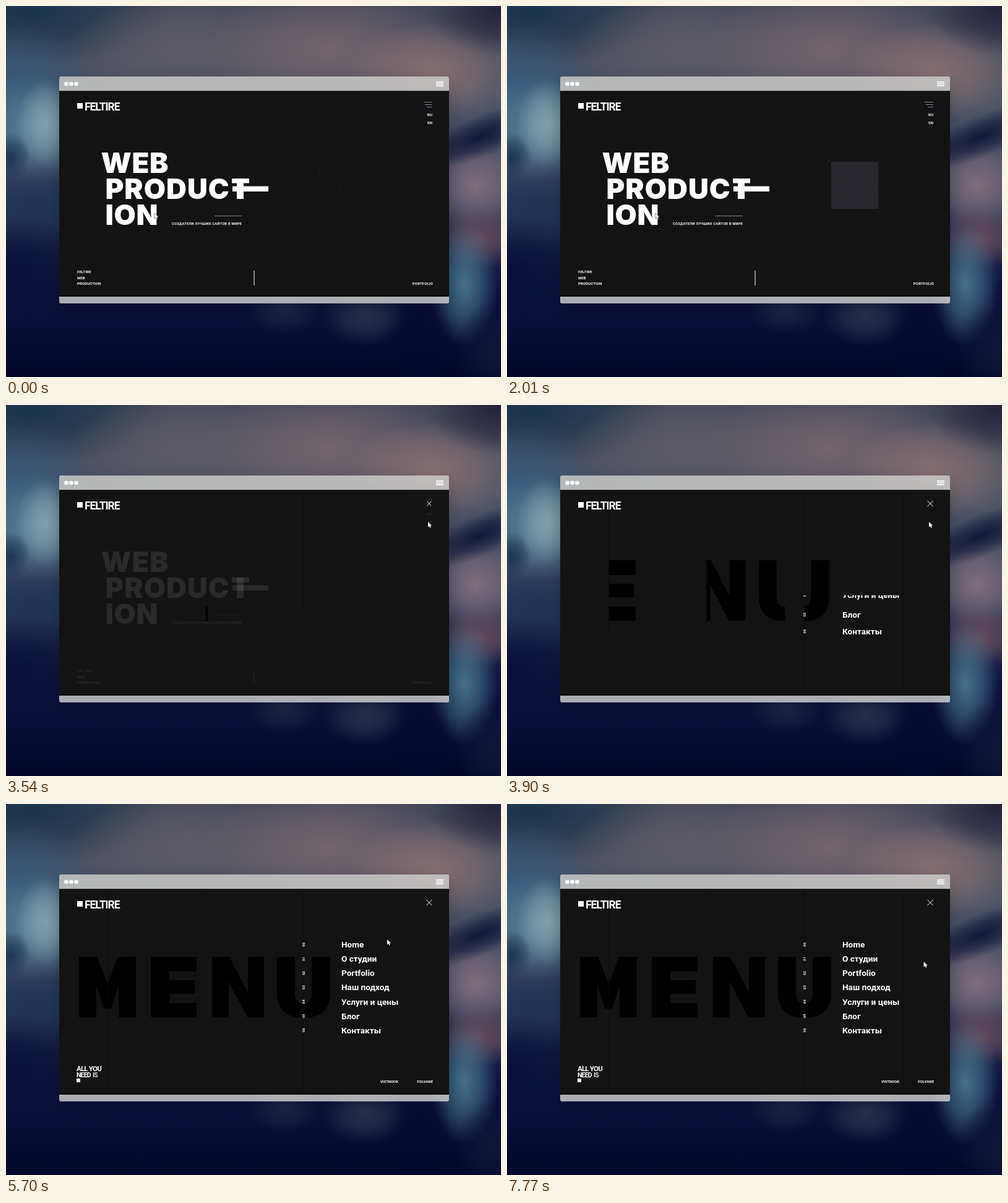
An HTML page with a canvas that plays this animation: 800x600 px, repeating every 7.8 s.

```html
<!DOCTYPE html>
<html lang="ru">
<head>
<meta charset="utf-8">
<title>Web production</title>
<style>
html, body { margin: 0; width: 100%; height: 100%; overflow: hidden; background: #04082a; }
canvas { display: block; }
</style>
</head>
<body>
<canvas id="stage" width="800" height="600"></canvas>
<script>
const LOOP = 7800, DARK = '#131313', WHITE = '#fff', VIOLET = '#85839a';
const canvas = document.getElementById('stage');
let ctx = canvas.getContext('2d');

const clamp = v => Math.max(0, Math.min(1, v));
const ramp = (t, start, length) => clamp((t - start) / length);
const easeOut = u => 1 - (1 - u) ** 3;
const easeInOut = u => u < .5 ? 4 * u ** 3 : 1 - 4 * (1 - u) ** 3;

function rect(x, y, w, h, color) {
  ctx.fillStyle = color;
  ctx.fillRect(x, y, w, h);
}

function text(s, x, y, size, spacing = 0, weight = 700, family = 'Roboto') {
  ctx.font = `${weight} ${size}px ${family}, sans-serif`;
  ctx.letterSpacing = spacing + 'px';
  ctx.fillStyle = WHITE;
  ctx.fillText(s, x, y);
}

function textRight(s, right, y, size, spacing) {
  ctx.textAlign = 'right';
  text(s, right + spacing, y, size, spacing);
  ctx.textAlign = 'left';
}

function clipped(x, y, w, h, draw) {
  ctx.save();
  ctx.beginPath();
  ctx.rect(x, y, w, h);
  ctx.clip();
  draw();
  ctx.restore();
}

// Content drops into its box from above
function drop(u, top, height, draw) {
  if (u <= 0) return;
  clipped(86, top, 630, height, () => {
    ctx.translate(0, -height * (1 - easeOut(u)));
    draw();
  });
}

// Blurred backdrop: x, y, radii, colour, tilt
const blobs = [
  [40, 10, 220, 90, '#16324c'],
  [20, 130, 130, 100, '#33597a'],
  [300, 70, 200, 90, '#5d5b65'],
  [520, 70, 200, 100, '#74656c'],
  [690, 105, 140, 80, '#8a7072'],
  [800, 0, 120, 80, '#20203a'],
  [45, 200, 110, 90, '#54809a'],
  [66, 190, 50, 70, '#86a4ae'],
  [8, 245, 32, 40, '#1c3450'],
  [45, 325, 110, 70, '#1e3356'],
  [20, 430, 130, 90, '#091038'],
  [760, 290, 90, 80, '#85707e'],
  [765, 212, 110, 34, '#0e1436', -.4],
  [765, 375, 75, 50, '#6a4c5c'],
  [740, 450, 55, 100, '#4a7890'],
  [795, 555, 70, 80, '#10173a'],
  [580, 500, 70, 50, '#2c3450'],
  [450, 490, 60, 40, '#1e2848'],
  [668, 545, 55, 85, '#040a30']
];

function frosted(y, h, corners) {
  ctx.fillStyle = 'rgba(203,203,201,.84)';
  ctx.beginPath();
  ctx.roundRect(86, y, 630, h, corners);
  ctx.fill();
}

function makeBackdrop() {
  const layer = document.createElement('canvas');
  layer.width = 800;
  layer.height = 600;
  const screen = ctx;
  ctx = layer.getContext('2d');

  const sky = ctx.createLinearGradient(0, 0, 0, 600);
  ['#45485a', '#505667', '#34405e', '#0c1440', '#03072a']
    .forEach((color, i) => sky.addColorStop(i / 4, color));
  rect(0, 0, 800, 600, sky);

  for (const [x, y, rx, ry, color, tilt = 0] of blobs) {
    ctx.save();
    ctx.translate(x, y);
    ctx.rotate(tilt);
    ctx.scale(rx, ry);
    const glow = ctx.createRadialGradient(0, 0, 0, 0, 0, 1);
    glow.addColorStop(0, color + 'f0');
    glow.addColorStop(.5, color + '90');
    glow.addColorStop(1, color + '00');
    rect(-1, -1, 2, 2, glow);
    ctx.restore();
  }

  // Shadow is cast only outside the window
  ctx.save();
  ctx.beginPath();
  ctx.rect(0, 0, 800, 600);
  ctx.roundRect(86, 114, 630, 367, 3);
  ctx.clip('evenodd');
  ctx.shadowColor = 'rgba(0,0,10,.25)';
  ctx.shadowBlur = 30;
  ctx.shadowOffsetY = 10;
  ctx.beginPath();
  ctx.roundRect(87, 115, 628, 365, 4);
  ctx.fill();
  ctx.restore();

  frosted(114, 24, [3, 3, 0, 0]);
  frosted(470, 11, [0, 0, 3, 3]);
  rect(86, 138, 630, 332, DARK);
  rect(86, 137, 630, 1, '#333');
  rect(86, 468, 630, 2, '#080808');
  ctx.fillStyle = WHITE;
  for (const x of [97.5, 105.5, 113.5]) {
    ctx.beginPath();
    ctx.arc(x, 126, 3.3, 0, 7);
    ctx.fill();
  }
  for (const y of [122, 125, 128]) rect(695, y, 12, 1.7, WHITE);
  rect(115, 157, 9, 9, WHITE);
  text('FELTIRE', 127, 169, 17.5, -1.1);

  ctx = screen;
  return layer;
}

// A plain square gathers among drifting dust, then vanishes
function drawEmblem(t) {
  const shown = easeInOut(ramp(t, 60, 1200)) * (1 - easeInOut(ramp(t, 2460, 500)));
  const side = 76 * shown;
  rect(562 - side / 2, 290 - side / 2, side, side, '#28272d');
  if (t > 2960) return;
  for (let i = 0; i < 9; i++) {
    const x = 492 + (i * 47.3) % 128, y = 222 + (i * 71.7) % 168;
    ctx.globalAlpha = .16 + .14 * Math.sin(i * 2.4 + t / 260);
    rect(x + (562 - x) * shown * .4, y + (290 - y) * shown * .4, 1.5, 1.5, '#aaa');
  }
  ctx.globalAlpha = 1;
}

function drawHome(t) {
  const leave = ramp(t, 3270, 300);
  if (leave >= 1) return;
  drawEmblem(t);
  ctx.save();
  ctx.globalAlpha = 1 - leave;

  text('WEB', 153.5, 270, 45.5, .7, 900, 'Inter');
  text('PRODUC', 160.5, 312, 45.5, 1, 900, 'Inter');
  text('ION', 160.5, 354, 45.5, .7, 900, 'Inter');
  rect(365, 279, 28, 7.5, WHITE);
  rect(373, 279, 11, 33, WHITE);
  rect(366, 291.5, 58, 8.5, WHITE);

  rect(337, 339, 44, 1, VIOLET);
  text('СОЗДАТЕЛИ ЛУЧШИХ САЙТОВ В МИРЕ', 268, 354, 5.6, .3);
  ['FELTIRE', 'WEB', 'PRODUCTION'].forEach((s, i) => text(s, 115, 432.4 + i * 9.3, 6, .1));
  textRight('PORTFOLIO', 690, 450.6, 6, .15);
  textRight('RU', 689, 177.5, 6, .2);
  textRight('EN', 689, 191, 6, .2);

  const pulse = ramp(t, 60, 660) + ramp(t, 2460, 600);
  const grow = easeInOut(pulse % 1);
  if (grow < .5) rect(400.5, 428 + 48 * grow, 1, 24 * (1 - 2 * grow), WHITE);
  else rect(400.5, 428, 1, 24 * (2 * grow - 1), WHITE);

  const hover = easeInOut(ramp(t, 2760, 340));
  const reach = 680 - 475 * hover + 475 * easeInOut(leave);
  rect(675, 155, 13.5, 1, VIOLET);
  rect(677 - 2 * hover, 159, 11.5 + 2 * hover, 1, VIOLET);
  rect(reach, 163, 688.5 - reach, 1, VIOLET);
  ctx.restore();
}

const menuWord = new Path2D(
  'M118 345V247H147L164 291L181 247H210V345H182V293L170 331H158L146 293V345Z' +
  'M234 247H308V271H264V285H305V307H264V322H308V345H234Z' +
  'M333 247H361L391 305V247H417V345H390L360 287V345H333Z' +
  'M438 247V305Q438 346 481 346Q524 346 524 305V247H494V306Q494 322 481 322Q467 322 467 306V247Z');
const edges = [86, 164.5, 322.5, 480.5, 640.5];
const starts = [4350, 3540, 3395, 3230, 3100];
const items = ['Home', 'О студии', 'Portfolio', 'Наш подход', 'Услуги и цены', 'Блог', 'Контакты'];

function drawMenu(t) {
  if (t < 3230) return;
  const lift = Math.max(0, 4 - Math.max(0, t - 3900) / 240);

  edges.forEach((x, k) => {
    const p = easeInOut(ramp(t, starts[k], 800));
    if (k) rect(x - .5, 138, 1, 330 * p ** .35, '#0d0d0d');
    if (k > 3 || !p) return;
    const width = edges[k + 1] - x, shift = -158 * (1 - p);
    if (width + shift <= 0) return;
    clipped(x, 138, width + shift, 330, () => {
      ctx.translate(shift, lift);
      ctx.fillStyle = '#000';
      ctx.fill(menuWord);
    });
  });

  items.forEach((name, i) => {
    const base = 232.2 + i * 23.08 + Math.min(1.2, lift);
    drop(ramp(t, 3835 + (4 - i) * 100, 400), base - 18, 24, () => {
      text(name, 542, base, 13.6);
      ctx.save();
      ctx.translate(483, base - 1.5);
      ctx.rotate(-Math.PI / 2);
      text('0' + i, 0, 0, 5.6, .2);
      ctx.restore();
    });
  });
  const hover = easeInOut(ramp(t, 5960, 240)) - easeInOut(ramp(t, 6510, 180));
  rect(489, 250, 46 * hover, 1, WHITE);

  const foot = ramp(t, 4460, 500);
  drop(foot, 422, 11, () => text('ALL YOU', 114, 432, 11.5, -.8));
  drop(foot, 432, 11, () => {
    text('NEED', 114, 441.6, 10.5, -.8);
    text('IS', 140, 441.6, 10.5, -.6, 500);
  });
  drop(foot, 443, 9, () => rect(114, 444, 6, 6, WHITE));
  drop(foot, 442, 11, () => textRight('FOLVANE', 690, 450.8, 6, .05));
  drop(ramp(t, 4600, 500), 442, 11, () => textRight('VISTNOOK', 634, 450.8, 6, -.05));

  const cross = 4.6 * easeOut(ramp(t, 3400, 400));
  ctx.strokeStyle = WHITE;
  ctx.lineWidth = 1;
  ctx.beginPath();
  for (const s of [1, -1]) {
    ctx.moveTo(684 - cross, 159.5 - s * cross);
    ctx.lineTo(684 + cross, 159.5 + s * cross);
  }
  ctx.stroke();
}

// Time, x, y
const route = [
  [0, 240, 335], [2460, 240, 335], [3000, 681, 185], [3270, 681, 185], [3500, 682, 189],
  [4890, 682, 189], [5600, 616, 219], [5700, 616, 219], [6050, 585, 250], [6480, 673.5, 255],
  [LOOP, 673.5, 255]
];
const arrow = new Path2D('M0 0V8.6L2 6.8L3.4 9.8L4.9 9.1L3.6 6.2H6.2Z');

function drawCursor(t) {
  const next = route.findIndex(point => point[0] > t);
  const [t0, x0, y0] = route[next - 1], [t1, x1, y1] = route[next];
  const p = easeInOut(ramp(t, t0, t1 - t0));
  ctx.save();
  ctx.translate(x0 + (x1 - x0) * p, y0 + (y1 - y0) * p);
  ctx.strokeStyle = '#000';
  ctx.lineWidth = .8;
  ctx.stroke(arrow);
  ctx.fillStyle = WHITE;
  ctx.fill(arrow);
  ctx.restore();
}

const backdrop = makeBackdrop();
const begin = performance.now();

function render() {
  const t = (performance.now() - begin) % LOOP;
  ctx.drawImage(backdrop, 0, 0);
  drawHome(t);
  drawMenu(t);
  drawCursor(t);
  requestAnimationFrame(render);
}
render();
</script>
</body>
</html>
```
